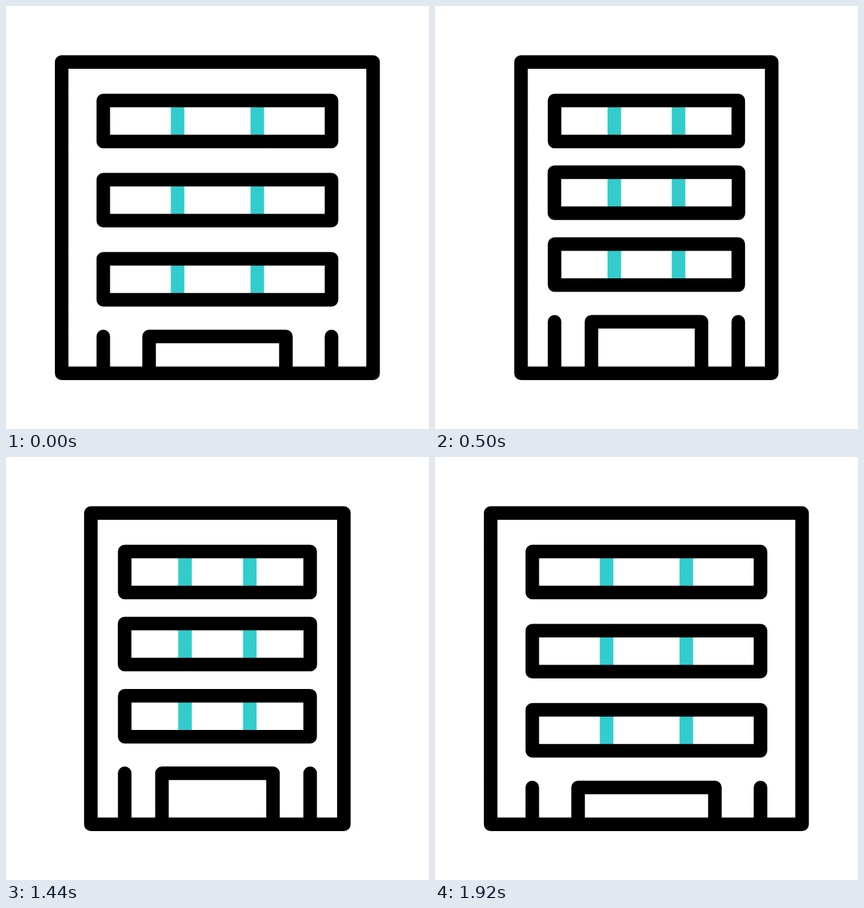
Recreate the animation shown at these times as an HTML page. Size 640x640 px, loop 2.4 s.

```html
<!DOCTYPE html>
<html lang="en">
<head>
<meta charset="utf-8">
<title>Building</title>
<style>
  html, body { margin: 0; width: 100%; height: 100%; overflow: hidden; background: #fff; }
  svg { display: block; width: 100%; height: 100%; }
  path { fill: none; stroke-width: 20.5; stroke-linejoin: round; }
  #bars { stroke: #33cccc; }
  #lines { stroke: #000; stroke-linecap: round; }
</style>
</head>
<body>
<svg viewBox="0 0 640 640">
  <path id="bars"/>
  <path id="lines"/>
</svg>
<script>
const LOOP = 2400, STEP = 20, MOVE = 680, BACK = 1240;
const TOP = 84.7, GROUND = 555.7, ROW_HEIGHT = 62;

// [wide, narrow] positions of each moving edge
const wall = [[84.2, 137.1], [555.4, 502.5]];
const post = [[147.2, 186], [492.5, 453.8]];
const bar = [[259.6, 273.1], [380.2, 366.7]];
const door = [[216.5, 239.8], [423.5, 400.1]];
const doorTop = [500, 474.3];
const rows = [
  { y: [143, 143], x: post },
  { y: [262.7, 249.9], x: [[147.2, 185.8], [492.5, 454.1]] },
  { y: [382.6, 356.9], x: post }
];

const bars = document.getElementById('bars');
const lines = document.getElementById('lines');

// cubic-bezier(.465, 0, .535, 1)
function ease(x) {
  if (x <= 0) return 0;
  if (x >= 1) return 1;
  const a = 0.465;
  let lo = 0, hi = 1;
  for (let i = 0; i < 30; i++) {
    const u = (lo + hi) / 2, v = 1 - u;
    if (3 * v * v * u * a + 3 * v * u * u * (1 - a) + u * u * u < x) lo = u;
    else hi = u;
  }
  return lo * lo * (3 - 2 * lo);
}

function narrowing(t) {
  return t < BACK ? ease(t / MOVE) : 1 - ease((t - BACK) / MOVE);
}

const box = (x1, y1, x2, y2) => `M${x1} ${y1}H${x2}V${y2}H${x1}Z`;
const upright = (x, y1, y2) => `M${x} ${y1}V${y2}`;

function draw(t) {
  const p = narrowing(t);
  const at = ([wide, narrow]) => wide + (narrow - wide) * p;
  const [left, right] = wall.map(at);
  const [d1, d2] = door.map(at);
  const lintel = at(doorTop);

  let black = box(left, TOP, right, GROUND);
  let cyan = '';
  for (const row of rows) {
    const y = at(row.y), [x1, x2] = row.x.map(at);
    black += box(x1, y, x2, y + ROW_HEIGHT);
    for (const b of bar) cyan += upright(at(b), y, y + ROW_HEIGHT);
  }
  for (const x of post) black += upright(at(x), lintel, GROUND);
  black += `M${d1} ${GROUND}V${lintel}H${d2}V${GROUND}`;

  lines.setAttribute('d', black);
  bars.setAttribute('d', cyan);
}

const start = performance.now();
function tick(now) {
  const t = Math.max(0, now - start) % LOOP;
  draw(Math.floor(t / STEP) * STEP);
  requestAnimationFrame(tick);
}
draw(0);
requestAnimationFrame(tick);
</script>
</body>
</html>
```
